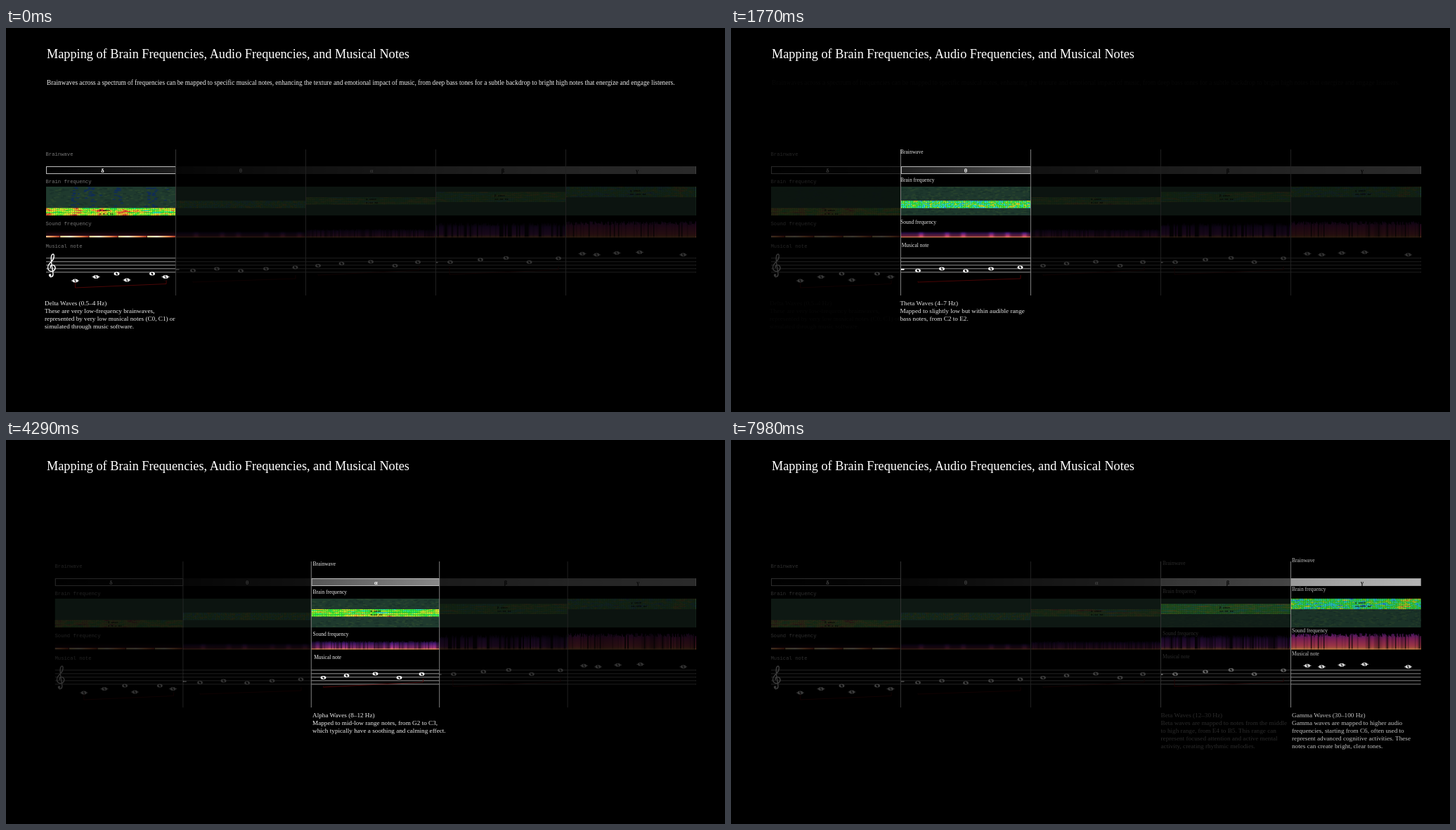
An HTML page with a canvas for the animation above (8 s loop, 1023 by 547 pixels).

```html
<!DOCTYPE html>
<html>
<head>
<meta charset="utf-8">
<style>
  html, body { margin: 0; width: 100%; height: 100%; overflow: hidden; background: #000; }
  .slide, .slide canvas, svg { position: absolute; left: 0; top: 0; width: 1023px; height: 547px; }
  .slide { background: #000; }
  text { font-family: "Liberation Serif", serif; fill: #eee; }
  .title { font-size: 18.25px; fill: #fff; }
  .intro { font-size: 9.34px; }
  .caption { font-size: 9.2px; }
  .label { font-size: 7.5px; }
  .mono { font: 7.22px "Liberation Mono", monospace; }
</style>
</head>
<body>
<script>
const W = 1023, H = 547, LEFT = 57, COL = 184.9, LOOP = 8000, FADE = 380;
const ROWS = ['Brainwave', 'Brain frequency', 'Sound frequency', 'Musical note'];
const MONO_GREY = ['#777', '#222', '#222', '#222', '#333'];
const SHADE = [.8, .8, .8, .8, .75];

// band: top, bottom; heat: mean, spread, streak length; notes: x, y pairs
const WAVES = [
  { sign: 'δ', signX: 137.5, band: [256.5, 267], heat: [.63, .42, .78], hz: '0.5-4 Hz', hzX: 133, start: -1e4,
    notes: [98.5, 360, 128, 354.5, 157.5, 350, 172, 359, 208, 350, 227, 354.5], ledger: [0, 1, 3, 5],
    slur: [98.5, 362, 370, 228, 364.5], textX: 55,
    caption: ['Delta Waves (0.5–4 Hz)', 'These are very low-frequency brainwaves,', 'represented by very low musical notes (C0, C1) or', 'simulated through music software.'] },
  { sign: 'θ', signX: 334, band: [246, 256.5], heat: [.47, .55, .4], sound: 9, start: 1510,
    notes: [266, 345.5, 300, 343, 334, 346, 370, 343, 411.5, 341], rest: [241.5, 344],
    slur: [266, 361, 362, 412, 357], textX: 240.5, labelX: 241, labelY: 0,
    caption: ['Theta Waves (4–7 Hz)', 'Mapped to slightly low but within audible range', 'bass notes, from C2 to E2.'] },
  { sign: 'α', signX: 520, band: [241, 251.5], heat: [.58, .45, .88], sound: 13, hz: '8-12 Hz', hzX: 512, start: 3730,
    notes: [444, 338.5, 477.5, 335.5, 519, 333, 553.5, 338.5, 586, 333.5],
    slur: [444, 351, 352, 588, 345], textX: 436, labelX: 436.5, labelY: 0,
    caption: ['Alpha Waves (8–12 Hz)', 'Mapped to mid-low range notes, from G2 to C3,', 'which typically have a soothing and calming effect.'] },
  { sign: 'β', signX: 707, band: [233.5, 248], heat: [.5, .42, .85], sound: 22, hz: '12-30 Hz', hzX: 695, start: 5385,
    notes: [632, 333.5, 675, 330, 711.5, 327.5, 744.5, 333.5, 786, 328], rest: [611.5, 334], fieldTop: 233.5,
    slur: [631, 340, 351, 786, 344.5], textX: 611.5, labelX: 614, labelY: -1,
    caption: ['Beta Waves (12–30 Hz)', 'Beta waves are mapped to notes from the middle', 'to high range, from E4 to B5. This range can', 'represent focused attention and active mental', 'activity, creating rhythmic melodies.'] },
  { sign: 'γ', signX: 898, band: [226, 241], heat: [.43, .48, .7], sound: 23, hz: '30-100 Hz', hzX: 888, start: 7815,
    notes: [820, 321.5, 840.5, 323, 869, 320.5, 901.5, 319.5, 963.5, 323], ledger: [0, 1, 2, 3, 4],
    textX: 798, labelX: 798, labelY: -4.7,
    caption: ['Gamma Waves (30–100 Hz)', 'Gamma waves are mapped to higher audio', 'frequencies, starting from C6, often used to', 'represent advanced cognitive activities. These', 'notes can create bright, clear tones.'] }
];
const THETA_PEAKS = [270, 307, 330, 370, 393, 417];
const CLEF = new Path2D('M63.5 342C62 338 67 336 69.5 339.5C71.5 343 68 347.5 63.5 346.5C58.5 345 58.5 339 62 335.5C65.5 332 69 329 68.3 324C67.8 321 65.5 321.5 64.5 325C63.5 330 65.5 340 67 350C67.5 355 62 356 62 352');

let seed = 1;
const rand = () => (seed = seed * 16807 % 2147483647) / 2147483647;
const bell = (x, mid, width) => Math.exp(-(((x - mid) / width) ** 2));

function verticalFade(c, top, bottom, stops) {
  const fade = c.createLinearGradient(0, top, 0, bottom);
  stops.forEach(([at, color]) => fade.addColorStop(at, color));
  return fade;
}

function drawBar(c, wave, x, i, lit) {
  const shade = c.createLinearGradient(LEFT, 0, LEFT + 5 * COL, 0);
  ['#000', '#1e1e1e', '#555', '#888', '#b4b4b4', '#d4d4d4'].forEach((color, n) => shade.addColorStop(n / 5, color));
  c.fillStyle = shade;
  c.fillRect(x, 197, COL, 11);
  if (lit || !i) {
    c.strokeStyle = '#bbb';
    c.lineWidth = 1;
    c.strokeRect(x + .5, 197.5, COL - 1, 10);
  }
  c.fillStyle = i < 3 ? '#fff' : '#111';
  c.textAlign = 'center';
  c.font = 'bold 8.5px "Liberation Serif", serif';
  c.fillText(wave.sign, wave.signX, 205.6);
}

function drawBrain(c, wave, x, i, lit) {
  const fieldTop = lit && wave.fieldTop || 226;
  c.fillStyle = lit ? '#1f3a2e' : '#3c6450';
  c.fillRect(x, fieldTop, COL, 267 - fieldTop);
  for (let n = 0; lit && n < 420; n++) {
    const px = rand() * COL, py = fieldTop + rand() * (265.5 - fieldTop);
    const streak = i ? 0 : bell(px, 39, 6) + bell(px, 62, 7) + bell(px, 100, 6) + bell(px, 150, 9);
    c.fillStyle = rand() < streak ? '#102c58' : rand() < .5 ? '#1a322a' : '#28442e';
    c.fillRect(x + px, py, Math.min(4, COL - px), 1.5);
  }
  const [top, bottom] = wave.band, [mean, spread, run] = wave.heat;
  const tone = lit ? '92% 57%' : '36% 50%';
  for (let y = top; y < bottom; y += 1.5) {
    let s = rand() - .5;
    for (let px = 0; px < COL; px += 1.5) {
      s = run * s + Math.sqrt(1 - run * run) * (rand() - .5);
      let v = mean + spread * s;
      if (i === 0) v += .17 * (bell(px, 4, 8) + bell(px, 42, 7) + bell(px, 76, 8) + bell(px, 110, 8));
      if (i === 4) v += .2 * bell(px, 162, 10);
      c.fillStyle = `hsl(${240 * (1 - Math.max(0, Math.min(1, v)))} ${tone})`;
      c.fillRect(x + px, y, Math.min(1.5, COL - px), Math.min(1.5, bottom - y));
    }
  }
  if (!wave.hz) return;
  c.fillStyle = '#111';
  c.textAlign = 'left';
  c.font = 'bold 4.2px "Liberation Mono", monospace';
  const mid = (top + bottom) / 2;
  c.fillText(wave.sign + ' wave', wave.hzX, mid - 1);
  c.fillText(wave.hz, wave.hzX, mid + 4);
}

function drawSound(c, wave, x, i) {
  if (!i) {
    c.fillStyle = verticalFade(c, 287, 297, [[0, '#0000'], [1, '#3a1020']]);
    c.fillRect(x, 287, COL, 9);
    for (let from = x - 21; from < x + COL; from += 41.2) {
      const glow = c.createLinearGradient(from, 0, from + 41.2, 0);
      ['#ffd890', '#fff4d0', '#ffa060', '#a03020'].forEach((color, n) => glow.addColorStop(n / 3, color));
      c.fillStyle = glow;
      const a = Math.max(x, from);
      c.fillRect(a, 296, Math.min(from + 40.5, x + COL) - a, 2.3);
    }
    return;
  }
  const top = 298.3 - wave.sound;
  c.fillStyle = verticalFade(c, top, 298.3, [
    [0, i === 4 ? '#6a2498' : '#401a7000'],
    [.35, i === 4 ? '#b83080' : '#58208c'],
    [.8, ['', '#e04878', '#c03c98', '#9a30a0', '#f05468'][i]],
    [1, '#ffa458']
  ]);
  let r = 0;
  for (let px = 0; px < COL; px += 1) {
    if (px % 2 === 0) r = rand();
    let level = [0, .5, .35 + .6 * r, r < .3 ? .12 : .3 + r, r < .14 ? .25 : .5 + r][i];
    if (i === 1) level += THETA_PEAKS.reduce((sum, p) => sum + .6 * bell(x + px, p, 3.5), 0);
    c.globalAlpha = Math.min(1, level);
    const cut = i === 1 ? 0 : rand() * wave.sound * .25, w = Math.min(1, COL - px);
    c.fillRect(x + px, top + cut, w, wave.sound - cut);
    c.globalAlpha = .75;
    c.fillRect(x + px, 297, w, 1.3);
  }
  c.globalAlpha = 1;
}

function drawMusic(c, wave, x, i) {
  c.fillStyle = '#aaa';
  for (let n = 0; n < 5; n++) c.fillRect(x, 327.4 + n * 5, COL, .9);
  if (wave.slur) {
    const [x1, y1, y2, x2, y3] = wave.slur;
    c.strokeStyle = '#600a0a';
    c.lineWidth = .8;
    c.beginPath();
    c.moveTo(x1, y1);
    c.lineTo(x1, y2);
    c.lineTo(x2, y3);
    c.lineTo(x2, y3 - 5);
    c.stroke();
  }
  c.fillStyle = '#fff';
  if (wave.rest) c.fillRect(wave.rest[0], wave.rest[1] - 1, i === 1 ? 5 : 3, 2);
  for (let n = 0; n < wave.notes.length; n += 2) {
    const nx = wave.notes[n], ny = wave.notes[n + 1];
    if (wave.ledger && wave.ledger.includes(n / 2)) c.fillRect(nx - 5.5, ny - .4, 11, .8);
    c.beginPath();
    c.ellipse(nx, ny, 4, 2.5, 0, 0, 7);
    c.ellipse(nx, ny, 1.9, 1.2, .9, 0, 7);
    c.fill('evenodd');
  }
  if (!i) {
    c.strokeStyle = '#fff';
    c.lineWidth = 1.4;
    c.stroke(CLEF);
    c.beginPath();
    c.arc(62.6, 352, 1.8, 0, 7);
    c.fill();
  }
}

function drawChart(c, active) {
  seed = 4711;
  if (active === 2) c.setTransform(.986, 0, 0, 1, 981.5 * .014, 0);
  WAVES.forEach((wave, i) => {
    const x = LEFT + i * COL, lit = i === active;
    for (const draw of [drawBar, drawBrain, drawSound, drawMusic]) draw(c, wave, x, i, lit);
    if (lit) return;
    c.fillStyle = `rgba(0,0,0,${SHADE[active]})`;
    c.fillRect(x, 170, COL, 212);
  });
  for (let i = 1; i < 5; i++) {
    const lit = active && (i === active || i === active + 1);
    c.fillStyle = lit ? '#808080' : active % 4 === 0 && i === 1 ? '#363636' : '#202020';
    c.fillRect(Math.floor(LEFT + i * COL - .4), 173, 1, 208);
  }
}

const line = (cls, x, y, words, fill) =>
  `<text class="${cls}" x="${x}" y="${y}"${fill ? ` style="fill:${fill}"` : ''}>${words}</text>`;
const sheet = content => `<svg viewBox="0 0 ${W} ${H}">${content}</svg>`;

const slides = WAVES.map((wave, i) => {
  const slide = document.createElement('div'), canvas = document.createElement('canvas');
  slide.className = 'slide';
  canvas.width = W;
  canvas.height = H;
  drawChart(canvas.getContext('2d'), i);
  let words = wave.caption.map((s, n) => line('caption', wave.textX, 395 + n * 10.9, s)).join('');
  words += ROWS.map((s, n) => line('mono', i === 2 ? 69.5 : 56.5, [181.7, 221.2, 280.5, 313][n], s, MONO_GREY[i])).join('');
  if (i) words += ROWS.map((s, n) => line('label', wave.labelX + (n === 3 && i < 3 ? 1.7 : 0), [178.6, 219.2, 279, 311.5][n] + wave.labelY, s)).join('');
  else words += line('intro', 58, 81, 'Brainwaves across a spectrum of frequencies can be mapped to specific musical notes, enhancing the texture and emotional impact of music, from deep bass tones for a subtle backdrop to bright high notes that energize and engage listeners.');
  slide.innerHTML = sheet(words);
  slide.prepend(canvas);
  document.body.append(slide);
  return slide;
});
document.body.insertAdjacentHTML('beforeend',
  sheet(line('title', 58, 43, 'Mapping of Brain Frequencies, Audio Frequencies, and Musical Notes')));

const origin = performance.now();
function tick() {
  const t = (performance.now() - origin) % LOOP;
  slides.forEach((slide, i) => {
    const p = Math.max(0, Math.min(1, (t - WAVES[i].start) / FADE));
    slide.style.opacity = 1 - (1 - p) ** 3;
  });
  requestAnimationFrame(tick);
}
tick();
</script>
</body>
</html>
```
